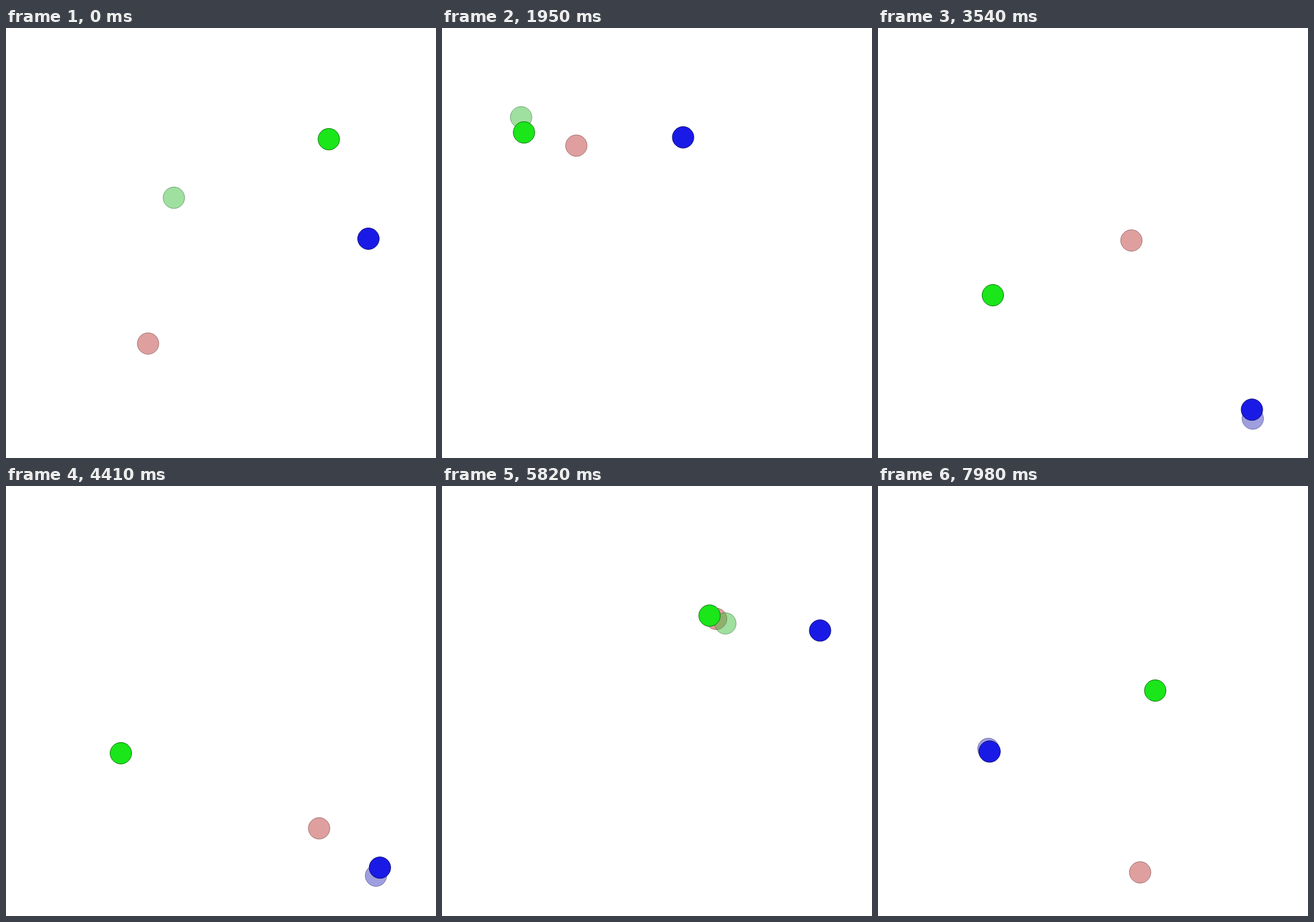
An HTML page with a canvas for the animation above (8000 ms loop, 700 px wide and 700 px high).

```html
<!DOCTYPE html>
<html lang="en">
<head>
<meta charset="utf-8">
<title>Push</title>
<style>
  html, body { margin: 0; width: 100%; height: 100%; overflow: hidden; background: #fff; }
  canvas { display: block; width: 700px; height: 700px; }
</style>
</head>
<body>
<canvas id="stage" width="700" height="700"></canvas>
<script>
const ctx = document.getElementById('stage').getContext('2d');
const LOOP = 8000, STEP = 30, EPISODE_STEPS = 51, RADIUS = 17.5;

const RED = [191, 64, 64];
const GOALS = {
  green: { solid: [26, 230, 26], pale: [64, 191, 64] },
  blue: { solid: [26, 26, 230], pale: [64, 64, 191] }
};

// Each agent runs from its start and reaches its hold point at step `at`.
const episodes = [
  { green: [525.5, 181], blue: [590, 343], goal: 'green', at: 38, damping: 0.25,
    runner: { start: [273.3, 276.3], hold: [536, 184] },
    rival: { start: [231.3, 513.7], hold: [455, 237] } },
  { green: [133.5, 170], blue: [392.5, 178], goal: 'green', at: 42, damping: 0.15,
    runner: { start: [172, 344], hold: [153.3, 167] },
    rival: { start: [297, 231], hold: [141, 152.3] } },
  { green: [187, 435], blue: [608.7, 621.3], goal: 'blue', at: 45, damping: 0.15,
    runner: { start: [590, 470], hold: [602.3, 634.3] },
    rival: { start: [282, 62], hold: [509.7, 557.3] } },
  { green: [435.5, 211], blue: [615.5, 235.3], goal: 'green', at: 41, damping: 0.2,
    runner: { start: [47, 366], hold: [461.3, 223.7] },
    rival: { start: [272, 341], hold: [446.3, 216.3] } },
  { green: [431.5, 597], blue: [264.8, 315], goal: 'green', at: 28, damping: 0.165,
    runner: { start: [147, 200], hold: [393.8, 618.5] },
    rival: { start: [500, 620], hold: [435.7, 593.3] } },
  { green: [451.3, 333], blue: [181.7, 432.3], goal: 'blue', at: 11, damping: 0.25,
    runner: { start: [558, 82], hold: [179.7, 428] },
    rival: { start: [500, 688], hold: [426.7, 629] } }
];

// Remaining share of the distance: an overshooting spring and a slow approach.
function spring(t, damping) {
  const w = 0.26;
  return Math.exp(-damping * t) * (Math.cos(w * t) + damping / w * Math.sin(w * t));
}
const approach = t => (1 + 0.12 * t) * Math.exp(-0.12 * t);

function travel({ start, hold }, target, remaining, t, at) {
  const drift = Math.min(1, t / at) ** 3;
  return start.map((from, i) => {
    const base = time => target[i] + (from - target[i]) * remaining(time);
    return base(t) + (hold[i] - base(at)) * drift;
  });
}

function disc([x, y], color, alpha) {
  ctx.beginPath();
  ctx.arc(x, y, RADIUS, 0, 2 * Math.PI);
  ctx.fillStyle = `rgba(${color}, ${alpha})`;
  ctx.fill();
  ctx.strokeStyle = `rgba(${color.map(c => c >> 1)}, ${alpha})`;
  ctx.stroke();
}

function draw(time) {
  const frame = Math.floor(time % LOOP / STEP);
  const episode = episodes[Math.floor(frame / EPISODE_STEPS)];
  const t = frame % EPISODE_STEPS;
  const { goal, runner, rival, at, damping } = episode;

  ctx.fillStyle = '#fff';
  ctx.fillRect(0, 0, 700, 700);
  disc(travel(rival, rival.hold, approach, t, at), RED, 0.5);
  disc(travel(runner, episode[goal], s => spring(s, damping), t, at), GOALS[goal].pale, 0.5);
  disc(episode.green, GOALS.green.solid, 1);
  disc(episode.blue, GOALS.blue.solid, 1);
}

const began = performance.now();
function tick() {
  draw(performance.now() - began);
  requestAnimationFrame(tick);
}
tick();
</script>
</body>
</html>
```
